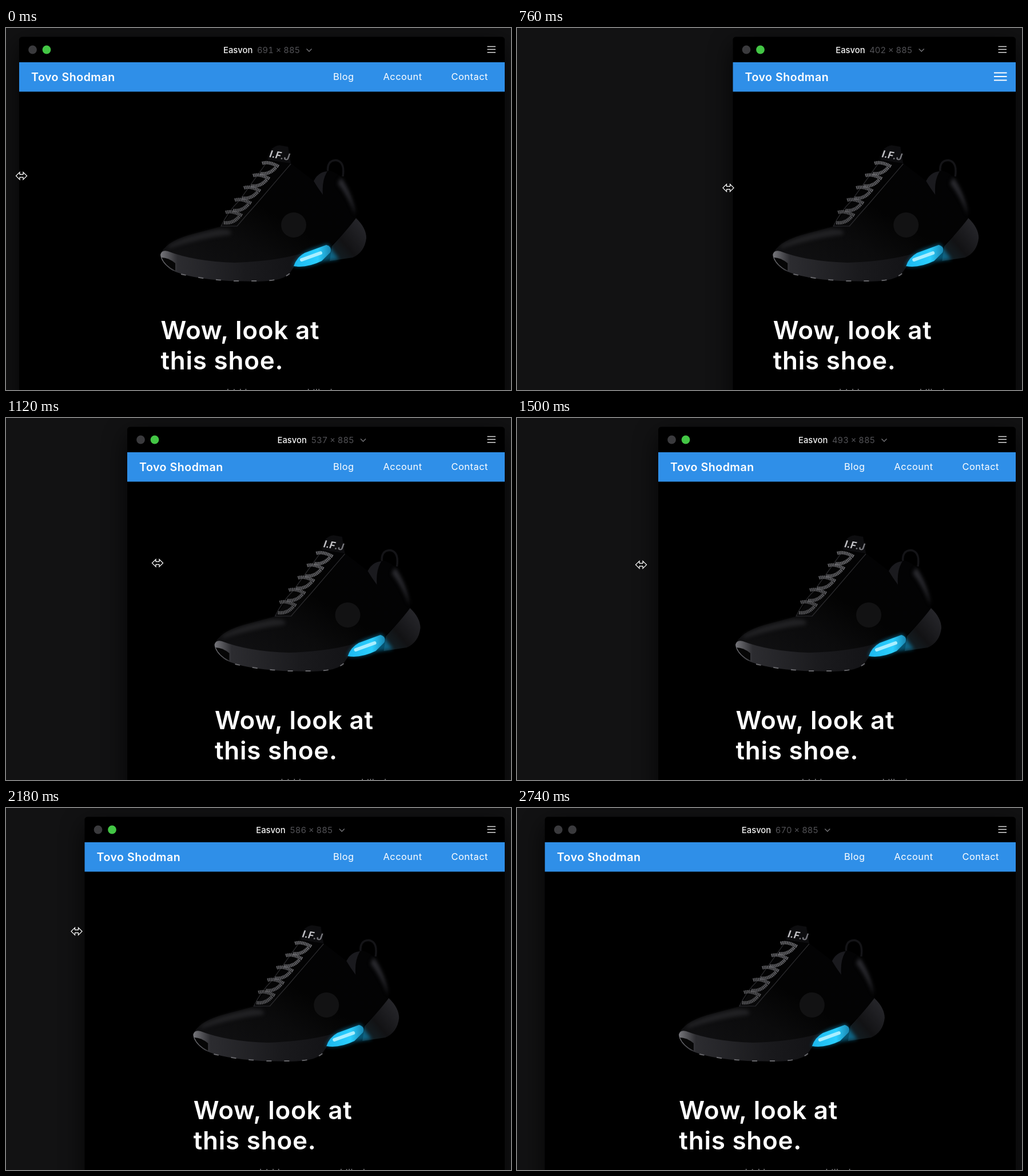
Recreate the animation shown at these times as an HTML page. Size 883 by 634 pixels, loop 2.76 s.

```html
<!DOCTYPE html>
<html lang="en">
<head>
<meta charset="utf-8">
<title>Resizing window</title>
<style>
  html, body { margin: 0; width: 100%; height: 100%; overflow: hidden; background: #121213; }
  svg { display: block; font-family: Inter, Roboto, sans-serif; fill: none; }
  .title { font-size: 14.8px; }
  .brand { font-size: 19.6px; font-weight: 600; letter-spacing: .5px; }
  .links { font-size: 16.4px; letter-spacing: .5px; }
  .head { font-size: 44px; font-weight: 600; letter-spacing: .75px; }
  #size { font-variant-numeric: tabular-nums; }
  #shadow { filter: blur(22px); opacity: .75; }
  .soft { filter: blur(3px); }
</style>
</head>
<body>
<svg width="883" height="634" viewBox="0 0 883 634">
  <defs>
    <linearGradient id="upper" x1="0" y1="1" x2="1" y2="0">
      <stop offset="0" stop-color="#111113"/>
      <stop offset=".3" stop-color="#0b0b0c"/>
      <stop offset=".5" stop-color="#030303"/>
      <stop offset=".85" stop-color="#030304"/>
      <stop offset="1" stop-color="#0d0d10"/>
    </linearGradient>
    <linearGradient id="sole" x1="0" x2="1">
      <stop offset="0" stop-color="#77777c"/>
      <stop offset=".12" stop-color="#2c2c30"/>
      <stop offset=".6" stop-color="#1a1a1d"/>
      <stop offset="1" stop-color="#121215"/>
    </linearGradient>
    <linearGradient id="heel" x1="0" y1="1" x2="1" y2="0">
      <stop offset="0" stop-color="#14262d"/>
      <stop offset=".4" stop-color="#121214"/>
      <stop offset="1" stop-color="#2b2b30"/>
    </linearGradient>
    <linearGradient id="glow" x1="0" x2="1">
      <stop offset="0" stop-color="#1cb8ee"/>
      <stop offset=".65" stop-color="#2bcfff"/>
      <stop offset="1" stop-color="#1a86b0"/>
    </linearGradient>
  </defs>

  <rect id="shadow" y="30" height="700" fill="#000"/>
  <rect id="frame" y="15.5" height="700" rx="5" fill="#000"/>

  <g id="left">
    <circle cx="23.5" cy="38" r="7.4" fill="#3a3a3d"/>
    <circle id="dot" cx="48" cy="38" r="7.4"/>
    <rect id="bar" y="60" height="51.5" fill="#2f8fe8"/>
    <text class="brand" x="21" y="93.3" fill="#fff">Tovo Shodman</text>
  </g>

  <g id="middle" class="title">
    <text x="-67.5" y="43.5" fill="#f4f4f4" font-weight="500">Easvon</text>
    <text id="size" x="-8.5" y="43.5" fill="#525256"></text>
    <path d="M78 36.5l4.5 4.5 4.5-4.5" stroke="#77777b" stroke-width="1.3"/>
  </g>
  <path d="M841.5 32.5h14.5m-14.5 5h14.5m-14.5 5.2h14.5" stroke="#dcdcdc" stroke-width="1.4"/>

  <g id="right">
    <g id="links" class="links" fill="#fff">
      <text x="572" y="91">Blog</text>
      <text x="659.5" y="91">Account</text>
      <text x="778.5" y="91">Contact</text>
    </g>
    <path id="menu" d="M834 78.5h22.5m-22.5 6.5h22.5m-22.5 6.5h22.5" stroke="#fff" stroke-width="2"/>
  </g>

  <g id="page">
    <g transform="translate(-447.5 0)">
      <path d="M563 254Q560 232 577 231.500Q593 234 589 260" stroke="#141417" stroke-width="3.500"/>
      <path d="M272 392Q285 371 330 360L375 348Q392 328 405 305L453 238Q459 207 478 205L494 208L498 237L538 268Q546 250 566 250Q590 256 600 285Q613 315 612 337L562 388Q480 412 400 412Q320 408 272 392Z" fill="url(#upper)"/>
      <path d="M284 381Q312 364 372 352Q400 352 392 362Q340 368 284 386Z" fill="#2a2a2d" opacity=".7" class="soft"/>
      <path d="M538 268Q546 252 562 251Q552 266 554 292Q545 280 538 268Z" fill="#1a1a1e"/>
      <path d="M586 262Q606 292 611 327Q598 294 580 272Z" fill="#2b2b30" class="soft"/>
      <circle cx="503" cy="345" r="22" fill="#121213"/>
      <path d="M498 238Q462 280 438 308Q420 328 404 347L376 347Q388 322 408 302L454 238" stroke="#2b2b2e" stroke-width="1.2"/>
      <path d="M458 231Q461 207 478 205.500L493 208L498 237Z" fill="#0d0d0f"/>
      <text transform="translate(460 226) rotate(10)" font-size="17" font-weight="700" font-style="italic" fill="#c4c4c8">I.F<tspan fill="#77777c">.J</tspan></text>
      <g id="laces"/>
      <path d="M270 397Q272 388 283 391Q330 409 400 411Q470 409 520 394L497 428Q488 443 440 444L390 443Q320 439 290 424Q271 411 270 397Z" fill="url(#sole)"/>
      <path d="M272 402Q284 402 296 412L296 425Q278 416 272 402Z" fill="#060606"/>
      <path d="M306 431Q350 441 400 443H450Q482 442 496 430" stroke="#66666a" stroke-width="2" stroke-dasharray="9 22"/>
      <path d="M612 333Q630 350 630 368Q627 393 606 402L566 408L570 382Q598 352 612 333Z" fill="url(#heel)"/>
      <path d="M502 417Q510 396 535 387L562 378L582 405L553 409Q525 421 502 417Z" fill="#0ba5df" opacity=".5" class="soft"/>
      <path d="M503 417Q508 402 522 394L560 380Q571 383 567 393L552 408Q525 421 503 417Z" fill="url(#glow)"/>
      <path d="M517 406L550 394" stroke="#a9eeff" stroke-width="6" stroke-linecap="round"/>
    </g>
    <g class="head" fill="#fff">
      <text x="-177" y="544.5">Wow, look at</text>
      <text x="-177" y="597.500">this shoe.</text>
    </g>
    <text x="-203" y="646" font-size="18" fill="#77777a">some worn on a bid by our new skilled crew</text>
  </g>

  <path id="cursor" d="M-9.500 0L-3-6.500V-2.500H3V-6.500L9.500 0L3 6.500V2.500H-3V6.500Z" fill="#000" stroke="#f0f0f0" stroke-width="1.3"/>
</svg>

<script>
const LOOP = 2760, STEP = 20, EDGE = 872, SCALE = 1.2287, BREAKPOINT = 590;

// time, window's left edge, pointer's lead over that edge, pointer's y
const keys = [
  [0, 23, 4, 259], [340, 210, 25, 270], [735, 378, 0, 280], [760, 377.5, -8, 280],
  [780, 371, -14, 279], [1000, 140, 0, 262], [1120, 212, 53, 254], [1310, 405, 3, 256],
  [1500, 247, -30, 257], [1635, 110, -6, 254], [1840, 272.3, 30, 244],
  [1930, 330, 4, 236], [2180, 137.5, -14, 216], [2400, 26, 0, 214], [2740, 48.7, 0, 218]
];
const $ = id => document.getElementById(id);
const set = (id, name, value) => $(id).setAttribute(name, value);
const move = (id, x, y = 0) => set(id, 'transform', `translate(${x} ${y})`);
const show = (id, on) => set(id, 'visibility', on ? 'visible' : 'hidden');

// Slope at a key: flat at turning points and at both ends.
function slope(i, col) {
  const a = keys[i - 1], b = keys[i], c = keys[i + 1];
  if (!a || !c || (b[col] - a[col]) * (c[col] - b[col]) <= 0) return 0;
  return (c[col] - a[col]) / (c[0] - a[0]);
}

function track(t, col) {
  t = Math.max(0, Math.min(t, 2740));
  let i = 0;
  while (i < keys.length - 2 && t > keys[i + 1][0]) i++;
  const a = keys[i], b = keys[i + 1], d = b[0] - a[0], u = (t - a[0]) / d, v = 1 - u;
  return v * v * ((1 + 2 * u) * a[col] + u * d * slope(i, col)) +
         u * u * ((1 + 2 * v) * b[col] - v * d * slope(i + 1, col));
}

function draw(t) {
  const x = track(t, 1), width = EDGE - x;
  const next = track(t + STEP, 1), last = track(t - STEP, 1);
  // Now and then the page is laid out one step ahead of a shrinking window.
  const gap = t / STEP % 5 === 2 ? Math.max(0, next - x) : 0;
  const pageWidth = width - gap;
  const labelWidth = EDGE + .5 - (t > 800 && x < last ? last : x);
  const wide = pageWidth >= BREAKPOINT, dragging = t < 2680;

  for (const id of ['shadow', 'frame']) {
    set(id, 'x', x);
    set(id, 'width', width);
  }
  move('left', x);
  set('bar', 'width', pageWidth);
  set('dot', 'fill', dragging ? '#43c645' : '#3a3a3d');
  move('middle', x + width / 2);
  $('size').textContent = `${Math.floor(labelWidth / SCALE)} × 885`;
  move('right', -gap);
  show('links', wide);
  show('menu', !wide);
  move('page', x + pageWidth / 2);
  move('cursor', x + track(t, 2), track(t, 3));
  show('cursor', dragging);
}

// Striped lace crossings down the throat of the shoe.
let laces = '';
for (let i = 0; i < 5; i++) {
  const x = 464 - i * 16, y = 242 + i * 21.5;
  laces += `<path d="M${x - 16} ${y - 5}q12 -4 29 6M${x - 19} ${y + 13}q16 2 27 -11"
    stroke="hsl(240 2% ${42 - i * 2}%)" stroke-width="6" stroke-dasharray="2 .8"/>`;
}
$('laces').innerHTML = laces;

const start = performance.now();
function tick() {
  const t = (performance.now() - start) % LOOP;
  draw(Math.floor(t / STEP) * STEP);
  requestAnimationFrame(tick);
}
tick();
</script>
</body>
</html>
```
